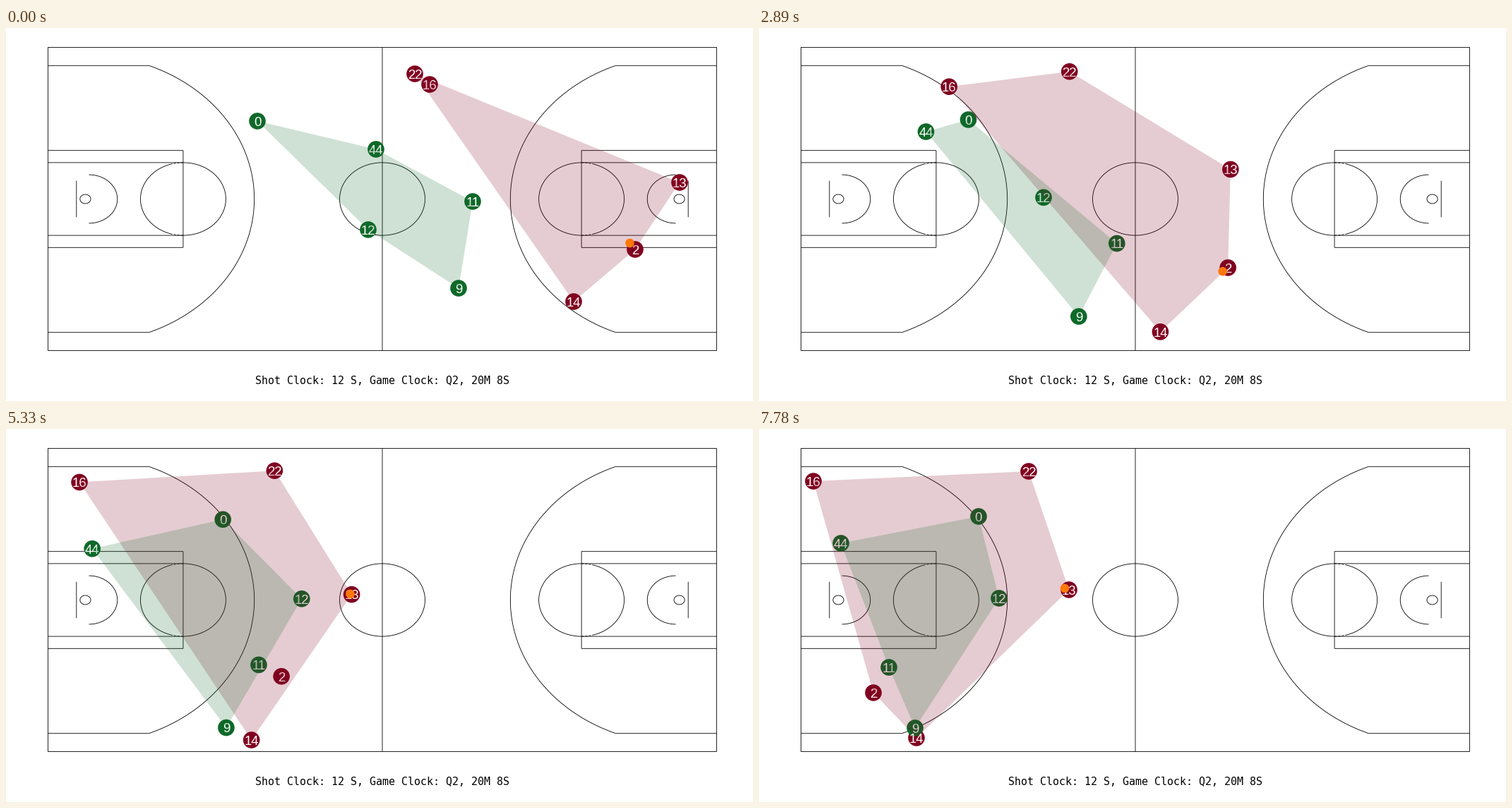
Recreate the animation shown at these times as a matplotlib script. Size 1058 px wide and 529 px high, loop 8000 ms.

```python
import matplotlib.pyplot as plt
import numpy as np
from matplotlib.animation import FuncAnimation
from matplotlib.patches import Circle, Polygon

W, H = 1058, 529
DPI = 64
PX = 72 / DPI                       # points per pixel
LOOP_MS, FRAMES, STEPS = 8000, 200, 36

LEFT, RIGHT, TOP, BOTTOM = 59.5, 1006.5, 27.5, 457.5
MID_X, MID_Y = (LEFT + RIGHT) / 2, (TOP + BOTTOM) / 2
FT_X, FT_Y = (RIGHT - LEFT) / 94, (BOTTOM - TOP) / 50

RED, GREEN, ORANGE = "#800020", "#0f6929", "#ff7808"

# Waypoints of each run, reached at the shared key steps.
KEYS = np.array([0, 9, 20, 29, 35])
AWAY = {
    "22": [(579, 65), (474, 64), (397, 58), (371, 61), (382, 60)],
    "16": [(600, 80), (361, 80), (143, 86), (80, 64), (77, 74)],
    "13": [(954, 219), (759, 200), (529, 214), (462, 253), (439, 228)],
    "2": [(891, 314), (750, 332), (493, 351), (269, 353), (162, 374)],
    "14": [(804, 388), (649, 422), (424, 439), (269, 441), (223, 438)],
}
HOME = {
    "0": [(356, 132), (302, 127), (303, 135), (312, 120), (311, 124)],
    "44": [(524, 172), (309, 146), (147, 160), (111, 177), (116, 162)],
    "11": [(661, 246), (552, 289), (422, 328), (274, 338), (184, 338)],
    "12": [(513, 286), (415, 250), (409, 234), (415, 249), (340, 240)],
    "9": [(641, 369), (510, 402), (359, 416), (262, 430), (221, 424)],
}
RELEASE, CATCH = 19, 22             # steps between which the pass flies


def run(points, t):
    """Position at step t on a smooth curve through the waypoints."""
    p = np.array(points, float)
    slope = np.gradient(p, KEYS, axis=0, edge_order=2)
    i = min(np.searchsorted(KEYS, t, side="right"), len(KEYS) - 1) - 1
    h = KEYS[i + 1] - KEYS[i]
    u = (t - KEYS[i]) / h
    ease = u * u * (3 - 2 * u)
    return (p[i] + ease * (p[i + 1] - p[i])
            + h * u * (1 - u) * ((1 - u) * slope[i] - u * slope[i + 1]))


def ball_at(t):
    """Dribbled around the passer, thrown, then swung around the catcher."""
    if t <= RELEASE:
        return run(AWAY["2"], t) + (-7.5, -9 * np.cos(np.pi * t / 10))
    if t >= CATCH:
        return run(AWAY["13"], t) + np.array([12, 4]) * np.cos(np.pi * (t - 29) / 9)
    u = (t - RELEASE) / (CATCH - RELEASE)
    return (1 - u) * ball_at(RELEASE) + u * ball_at(CATCH)


def hull(points):
    """Convex hull by monotone chain."""
    pts = sorted(map(tuple, points))

    def chain(seq):
        out = []
        for x, y in seq:
            while len(out) > 1:
                (ax_, ay), (bx, by) = out[-2:]
                if (bx - ax_) * (y - ay) - (by - ay) * (x - ax_) > 0:
                    break
                out.pop()
            out.append((x, y))
        return out[:-1]

    return chain(pts) + chain(pts[::-1])


fig = plt.figure(figsize=(W / DPI, H / DPI), dpi=DPI, facecolor="white")
ax = fig.add_axes([0, 0, 1, 1])
ax.set_xlim(0, W)
ax.set_ylim(H, 0)
ax.axis("off")


def line(xs, ys, **style):
    ax.plot(xs, ys, color="black", lw=0.85 * PX, zorder=1, snap=False,
            solid_capstyle="butt", **style)


def half_court(side):
    """Markings in feet from one baseline; side is -1 for left, 1 for right."""
    def mark(feet, across, **style):
        line(MID_X + side * (47 - np.asarray(feet)) * FT_X,
             MID_Y + np.asarray(across) * FT_Y, **style)

    def arc(centre, radius, start, end, **style):
        a = np.radians(np.linspace(start, end, 120))
        mark(centre + radius * np.cos(a), radius * np.sin(a), **style)

    corner = np.degrees(np.arcsin(22 / 23.75))
    arc(5.25, 23.75, -corner, corner)
    arc(5.25, 0.75, 0, 360)
    arc(5.75, 4, -90, 90)
    arc(19, 6, -90, 90)
    arc(19, 6, 107, 253)
    arc(47, 6, -90, 90)
    mark([19, 19], [-8, 8])
    mark([4, 4], [-3, 3])
    for s in (-1, 1):
        for length, across in ((19, 8), (19, 6), (14.2, 22)):
            mark([0, length], [s * across] * 2)
        arc(19, 6, 90 * s, 107 * s, dashes=(4, 2))


line([LEFT, RIGHT, RIGHT, LEFT, LEFT], [TOP, TOP, BOTTOM, BOTTOM, TOP])
line([MID_X, MID_X], [TOP, BOTTOM])
half_court(-1)
half_court(1)

ax.text(533.2, 505, "Shot Clock: 12 S, Game Clock: Q2, 20M 8S", ha="center", va="baseline",
        family="DejaVu Sans Mono", size=15 * PX, color="black")


class Team:
    def __init__(self, players, color, z):
        self.runs = list(players.values())
        self.dots = [ax.add_patch(Circle((0, 0), 11.8, fc=color, ec="none", zorder=z))
                     for _ in players]
        self.labels = [ax.text(0, 0, name, color="white", ha="center", va="baseline",
                               family="Liberation Sans", size=18.67 * PX, zorder=4)
                       for name in players]
        self.area = ax.add_patch(Polygon([(0, 0)] * 3, fc=color, ec="none",
                                         alpha=0.2, zorder=z + 3))

    def move(self, step):
        spots = [run(points, step) for points in self.runs]
        for (x, y), dot, label in zip(spots, self.dots, self.labels):
            dot.center = x, y
            label.set_position((x, y + 6.8))
        self.area.set_xy(hull(spots))


teams = [Team(AWAY, RED, 2), Team(HOME, GREEN, 3)]
ball = ax.add_patch(Circle((0, 0), 6.3, fc=ORANGE, ec="none", zorder=7))


def update(frame):
    step = int((frame + 0.5) * STEPS / FRAMES)      # positions hold between steps
    for team in teams:
        team.move(step)
    ball.center = tuple(ball_at(step))
    return []


anim = FuncAnimation(fig, update, frames=FRAMES, init_func=lambda: update(0),
                     interval=LOOP_MS / FRAMES, repeat=True, repeat_delay=0, blit=False)
plt.show()
```
